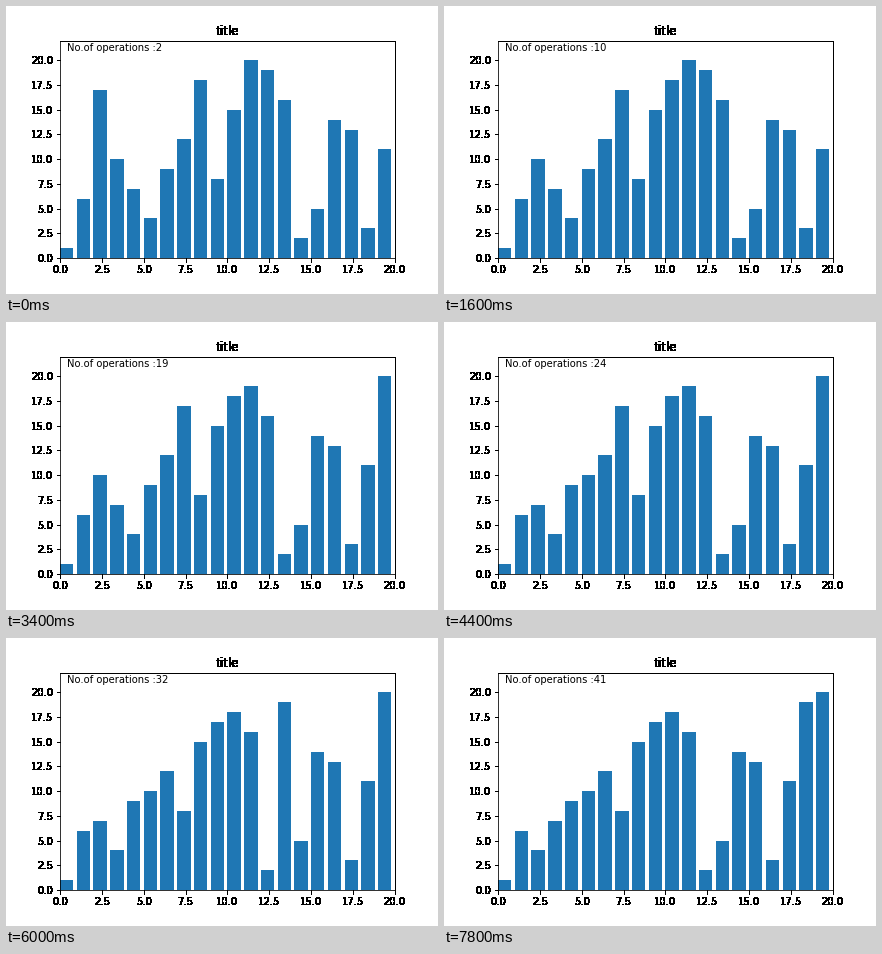
Animation of 432x288 px, one loop 8 s. Source, as a matplotlib script:

```python
import numpy as np
import matplotlib.pyplot as plt
from matplotlib.animation import FuncAnimation

FRAMES, INTERVAL = 40, 200
FIRST_COUNT = 2
START = [1, 6, 17, 10, 7, 4, 9, 12, 18, 8,
         15, 20, 19, 16, 2, 5, 14, 13, 3, 11]


def bubble_sort(values):
    """Yield a copy of the list after every comparison."""
    a = list(values)
    for i in range(len(a) - 1):
        for j in range(len(a) - 1 - i):
            if a[j] > a[j + 1]:
                a[j], a[j + 1] = a[j + 1], a[j]
            yield list(a)


def harden(img, dpi):
    """Turn every touched pixel fully opaque: heavy, jagged edges."""
    out = np.zeros_like(img)
    out[..., 3] = img[..., 3] > 0
    return out, 0, 0


steps = list(bubble_sort(START))

fig, ax = plt.subplots(figsize=(6, 4), dpi=72, facecolor="white")
fig.subplots_adjust(left=0.125, right=0.9, bottom=0.125, top=0.88)
n = len(START)
bars = ax.bar(range(n), START, width=0.8, align="edge", color="#1f77b4")
ax.set_xlim(0, n)
ax.set_ylim(0, int(1.1 * max(START)))
ax.set_xticks(np.arange(0, 20.1, 2.5))
ax.set_yticks(np.arange(0, 20.1, 2.5))
ax.xaxis.set_major_formatter("{x:.1f}")
ax.yaxis.set_major_formatter("{x:.1f}")
title = ax.set_title("title")
counter = ax.text(0.02, 0.95, "", transform=ax.transAxes)

# Everything outside the plot area has hard edges.
outside = [title, ax.spines["top"], ax.spines["right"]]
for axis in (ax.xaxis, ax.yaxis):
    for tick in axis.get_major_ticks():
        outside += [tick.label1, tick.tick1line]
for artist in outside:
    artist.set_agg_filter(harden)


def update(frame):
    count = frame + FIRST_COUNT
    for bar, height in zip(bars, steps[count - 1]):
        bar.set_height(height)
    counter.set_text(f"No.of operations :{count}")
    return [*bars, counter]


anim = FuncAnimation(fig, update, frames=FRAMES, interval=INTERVAL,
                     init_func=lambda: update(0), repeat=True,
                     repeat_delay=0, blit=False)
plt.show()
```
